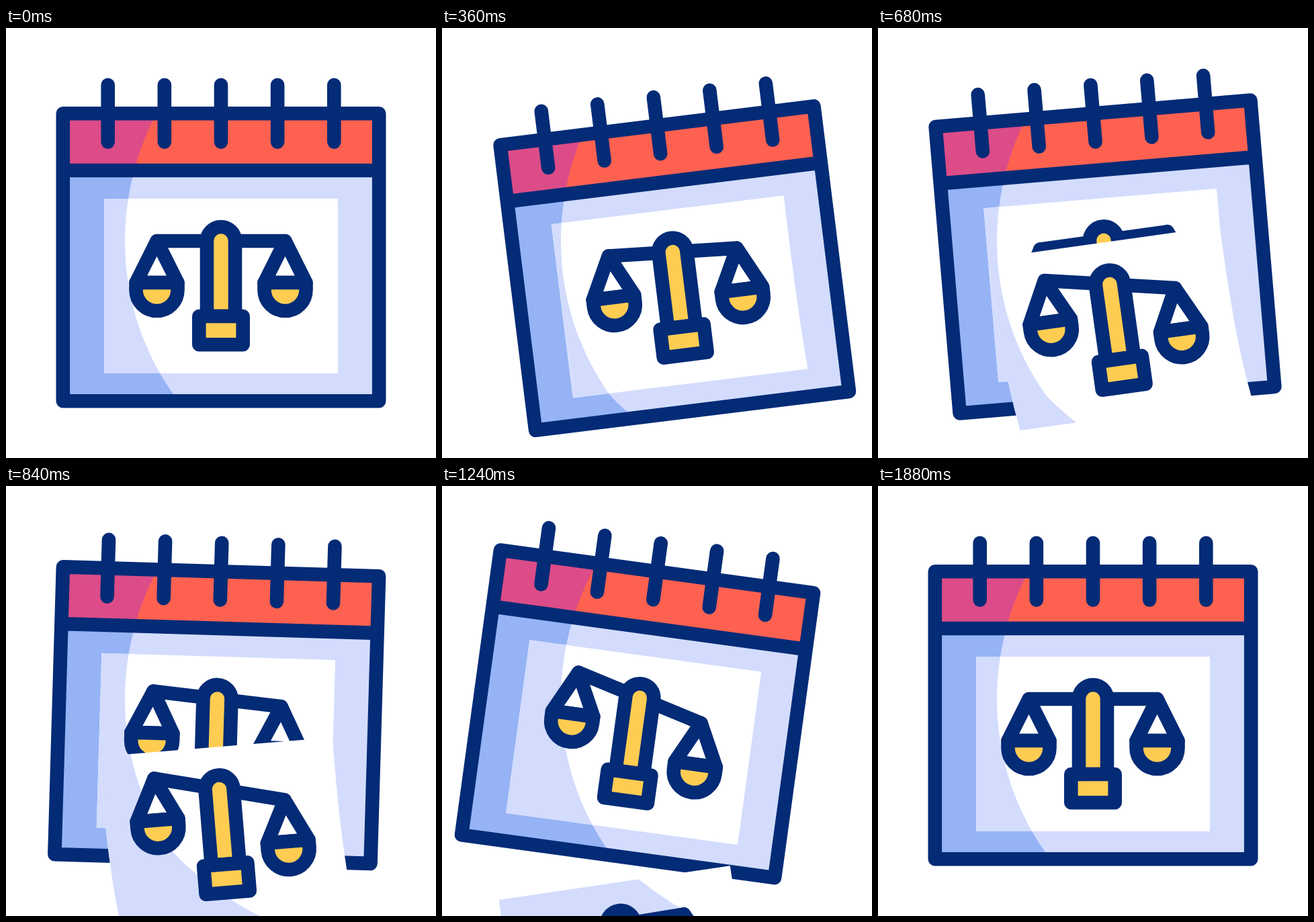
Recreate the animation shown at these times as an HTML page with a canvas. Size 640 by 640 pixels, loop 2 s.

```html
<!DOCTYPE html>
<html lang="en">
<head>
<meta charset="utf-8">
<title>Court calendar</title>
<style>
  html, body { margin: 0; width: 100%; height: 100%; overflow: hidden; background: #fff; }
  canvas { display: block; }
</style>
</head>
<body>
<canvas id="stage" width="640" height="640"></canvas>
<script>
const ctx = document.getElementById('stage').getContext('2d');
const NAVY = '#032b76', RED = '#ff6151', MAGENTA = '#dc4c88', GOLD = '#ffcc52';
const PALE = '#d3dcfd', BLUE = '#95b3f5', WHITE = '#fff';
const LOOP = 2000, STEP = 40;

// The shadow keeps its place on the stage while the calendar swings.
const shadow = new Path2D('M0 0H239L232 110L219 137C191.500 192.600 177 255 177 317' +
  'C177 399 202 478 249 545C268 568 330 618 378 640H0Z');

// Eased value between keys of [time, value].
function track(t, ...keys) {
  if (t <= keys[0][0]) return keys[0][1];
  for (let i = 1; i < keys.length; i++) {
    const [t0, a] = keys[i - 1], [t1, b] = keys[i];
    if (t < t1) {
      const u = (t - t0) / (t1 - t0);
      return a + (b - a) * u * u * (3 - 2 * u);
    }
  }
  return keys[keys.length - 1][1];
}

function rotate(degrees) {
  ctx.rotate(degrees * Math.PI / 180);
}

function fillShaded(path, light, dark) {
  ctx.fillStyle = light;
  ctx.fill(path);
  ctx.save();
  ctx.clip(path);
  ctx.resetTransform();
  ctx.fillStyle = dark;
  ctx.fill(shadow);
  ctx.restore();
}

function outline(d, fill) {
  const path = new Path2D(d);
  if (fill) {
    ctx.fillStyle = fill;
    ctx.fill(path);
  }
  ctx.stroke(path);
}

function box(x, y, w, h) {
  const path = new Path2D();
  path.rect(x, y, w, h);
  return path;
}

// A pan hanging from the beam end at (x, y).
function pan(x, y) {
  ctx.save();
  ctx.translate(x, y);
  outline('M-31 62L0 0L31 62Z', WHITE);
  outline('M-31 62H31V73A31 31 0 0 1 -31 73Z', GOLD);
  ctx.restore();
}

// Origin at the top of the column; tilt lowers the right pan.
function scales(tilt) {
  outline(`M-95.500 ${-tilt}L95.500 ${tilt}`);
  pan(-95.5, -tilt);
  pan(95.5, tilt);
  outline('M-21 112V0A21 21 0 0 1 21 0V112Z', GOLD);
  outline('M-32.700 112H32.700V154.300H-32.700Z', GOLD);
}

// Origin at the middle of the top edge; bend pushes the bottom edge sideways.
function page(tilt, bend) {
  const sheet = new Path2D(`M-174 0H174C174 87 174 173 ${174 + bend} 260` +
    `H${bend - 174}C-174 173 -174 87 -174 0Z`);
  fillShaded(sheet, WHITE, PALE);
  ctx.translate(0, 63);
  scales(tilt);
}

function calendar() {
  fillShaded(box(84.8, 212, 470.4, 343), PALE, BLUE);
  fillShaded(box(84.8, 127.3, 470.4, 85), RED, MAGENTA);
  outline('M84.800 127.300H555.200V555.200H84.800ZM84.800 212H555.200');
  for (let i = -2; i <= 2; i++) {
    const x = 320 + i * 84.15;
    outline(`M${x} 84.800V169.600`);
  }
}

function draw(t) {
  const swing = track(t, [80, 0], [480, -9], [1120, 9], [1640, 0]);
  const tug = track(t, [80, 0], [320, 19], [600, 0]);
  const fall = track(t, [360, 0], [1760, 1]);
  const bend = track(t, [200, 0], [600, 12]);
  const tornTilt = track(t, [80, 0], [980, -25.5], [1480, 25.5]);
  const nextTilt = track(t, [300, -25.5], [1180, 25.5], [1880, 0]);

  ctx.resetTransform();
  ctx.fillStyle = WHITE;
  ctx.fillRect(0, 0, 640, 640);
  ctx.strokeStyle = NAVY;
  ctx.lineWidth = 20.6;
  ctx.lineCap = ctx.lineJoin = 'round';

  ctx.translate(320, 127.3 + tug);
  rotate(swing);
  ctx.translate(-320, -127.3);
  calendar();

  ctx.translate(320, 254);
  ctx.save();
  page(-nextTilt * -1, 0);
  ctx.restore();

  ctx.translate(0, 495 * fall);
  rotate(-23.5 * fall);
  page(-tornTilt, bend);
}

function frame(now) {
  draw(Math.floor(now % LOOP / STEP) * STEP);
  requestAnimationFrame(frame);
}

const start = performance.now();
requestAnimationFrame(function tick() {
  frame = null;
  draw(Math.floor((performance.now() - start) % LOOP / STEP) * STEP);
  requestAnimationFrame(tick);
});
</script>
</body>
</html>
```
